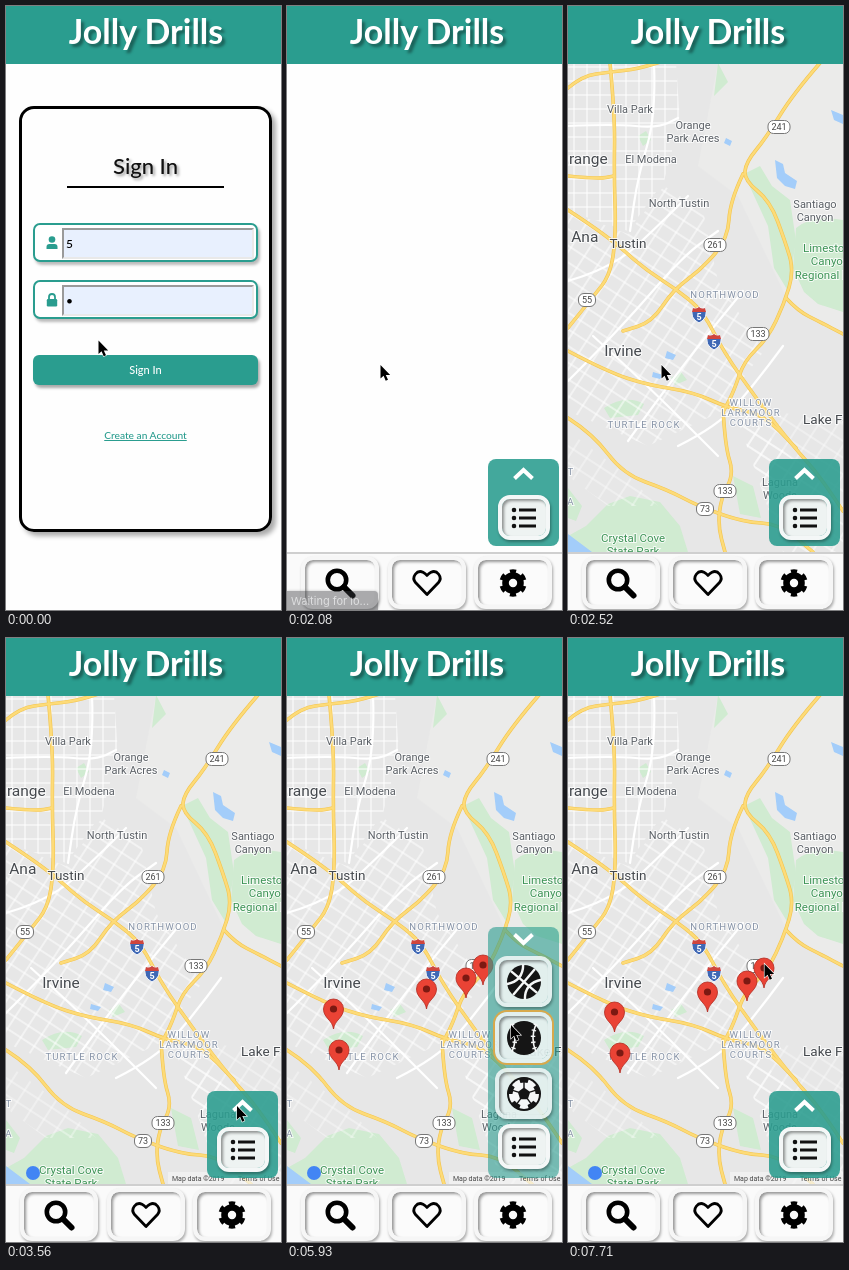
These frames come from a looping animation (275 px wide and 604 px high, 8 s). An HTML page:

```html
<!DOCTYPE html>
<html lang="en">
<head>
<meta charset="utf-8">
<title>Sports finder</title>
<style>
html, body { margin: 0; width: 100%; height: 100%; overflow: hidden; background: #fefefe; }
#stage { position: absolute; inset: 0; width: 275px; height: 604px; overflow: hidden; background: #fefefe;
  font: 500 11px Lato, 'Open Sans', sans-serif; }
#stage div, #stage > svg, #home > svg { position: absolute; box-sizing: border-box; }
.line { left: 0; width: 279px; text-align: center; white-space: nowrap; }
#head { left: 0; top: 0; width: 275px; height: 58px; background: #2a9d8f; }
#head .line { top: 0; width: 280px; font-size: 34px; line-height: 49px; font-weight: 700; color: #fff; text-shadow: 3px 3px 3px #0006; }
#card { left: 13px; top: 100px; width: 253px; height: 426px; border: 3px solid #000; border-radius: 15px;
  box-shadow: 4px 4px 5px #0005; }
#login .title { top: 145px; font-size: 22px; line-height: 30px; color: #111; text-shadow: 2px 2px 3px #0006; }
#rule { left: 61px; top: 180px; width: 157px; height: 1.6px; background: #000; }
.field { left: 27px; width: 225px; height: 39px; border: 2px solid #2a9d8f; border-radius: 7px; background: #fff;
  box-shadow: 2px 3px 3px #0004; }
.field div { left: 27px; top: 3px; width: 192px; height: 31px; border: 2px solid; border-color: #9a9a9a #e9e9e9 #e9e9e9 #9a9a9a;
  background: #e8f0fe; padding-left: 2px; line-height: 27px; font-size: 12px; color: #000; }
.field svg { position: absolute; left: 9px; top: 9px; fill: #2a9d8f; }
#submit { left: 27px; top: 349px; width: 225px; border-radius: 6px; background: #2a9d8f; color: #fff; text-align: center; }
#link { color: #2a9d8f; font-size: 10.2px; line-height: 18px; text-decoration: underline; }
#nav { left: 0; top: 546px; width: 275px; height: 58px; border-top: 2px solid #cfcfcf; background: #fafafa; }
#panel { left: 201px; width: 71px; border-radius: 8px; }
.btn { display: flex; align-items: center; justify-content: center; border: 4px solid #f6f6f6; border-radius: 12px;
  background: #fbfbfb; background-clip: padding-box; box-shadow: 1px 2px 3px #0005, inset 2px 2px 3px #0006; }
.btn svg { flex: none; }
.nav { top: 550px; width: 78px; height: 53px; }
.ball { left: 208px; width: 57px; height: 51px; border-color: #f4f7f7dd; background-color: #f6f8f8d8; }
#list { left: 211px; width: 52px; height: 45px; border-color: #f4f7f7; background-color: #eef3f2; }
#status { left: 0; top: 585px; width: 91px; height: 19px; border-radius: 0 4px 0 0; background: #3b3c40; color: #b9babd;
  font: 11px/20px Inter, sans-serif; padding-left: 4px; white-space: nowrap; box-shadow: 0 0 3px #0008; }
#map text { font-family: Roboto, 'Noto Sans', sans-serif; font-weight: 400; text-anchor: middle; fill: #5b6066;
  stroke: #fffc; stroke-width: 2px; paint-order: stroke; font-size: 11px; }
#map .city { font-size: 15.5px; fill: #45494e; }
#map .town { font-size: 13.5px; fill: #45494e; }
#map .area { font-size: 9.6px; letter-spacing: 1.1px; fill: #8592a6; }
#map .park { font-size: 11.5px; fill: #3d9456; }
#map .tag { font-size: 9px; fill: #444; stroke: none; }
#map .exit { font-size: 9px; font-weight: 700; fill: #fff; stroke: none; }
#map .note { font-size: 7px; fill: #444; stroke: none; text-anchor: start; }
</style>
</head>
<body>
<div id="stage">
  <div id="login">
    <div id="card"></div>
    <div class="line title">Sign In</div>
    <div id="rule"></div>
    <div class="field" style="top:217px"><svg width="16" height="18" viewBox="-8 -9 16 18"><circle cy="-3.5" r="3.3"/><path d="M-5.5 6V4Q-5.5 1 -2.5 1H2.5Q5.5 1 5.5 4V6Z"/></svg><div>5</div></div>
    <div class="field" style="top:274px"><svg width="16" height="18" viewBox="-8 -9 16 18"><rect x="-5.2" y="-1" width="10.4" height="7.5" rx="1.2"/><path d="M-3 -1V-3a3 3 0 0 1 6 0V-1" fill="none" stroke="#2a9d8f" stroke-width="1.8"/></svg><div>•</div></div>
    <div id="submit">Sign In</div>
    <div class="line" id="link">Create an Account</div>
  </div>

  <div id="home">
    <svg id="map" width="275" height="546">
      <defs>
        <pattern id="grid" width="13" height="14" patternUnits="userSpaceOnUse"><path d="M0 5H13M6 0V14" stroke="#fff"/></pattern>
        <pattern id="slant" width="16" height="14" patternUnits="userSpaceOnUse" patternTransform="rotate(33)"><path d="M0 5H16M6 0V14" stroke="#fff"/></pattern>
        <g id="pin"><path d="M0 0C-1 -9 -10 -11 -10 -20a10 10 0 0 1 20 0C10 -11 1 -9 0 0Z" fill="#ea4335" stroke="#b3291f" stroke-width=".8"/><circle cy="-20" r="3.6" fill="#7c1912"/></g>
        <g id="shield"><path d="M-6 -7Q-3 -5.5 0 -8Q3 -5.5 6 -7Q10 3 0 8Q-10 3 -6 -7Z" fill="#3f68b5" stroke="#fff"/><path d="M-6 -7Q-3 -5.5 0 -8Q3 -5.5 6 -7L7 -3H-7Z" fill="#d0453d"/></g>
      </defs>
      <rect width="275" height="546" fill="#e7e7e7"/>
      <path d="M150 57H275V330L220 295L170 190L130 160Z" fill="#ebebea"/>
      <g fill="#d0ebd1">
        <path d="M176 168L192 160L204 180L222 194L228 235L220 285L206 262L200 220Z"/>
        <path d="M228 222Q245 208 275 214V306L250 298L236 286L225 262Z"/>
        <path d="M18 520L40 498L62 490L92 496L112 520L120 546H0V530Z"/>
        <path d="M165 470L185 480L193 512L172 508ZM0 482L14 500L8 515L0 512ZM36 402Q58 388 76 398L70 409L42 412Z"/>
        <path d="M150 57L160 76L146 90ZM70 130l8 -5 5 9 -8 6ZM103 372l10 -6 6 8 -12 5Z"/>
      </g>
      <path d="M0 57H108L112 115L96 175L60 225L0 205Z" fill="url(#grid)"/>
      <path d="M0 205L60 228L96 180L135 205L150 275L196 345L160 392L275 500V546H215L165 400L80 440L0 405Z" fill="url(#slant)"/>
      <path d="M0 425L60 470L90 500L40 500L0 470ZM165 400L275 415V500L190 470Z" fill="url(#slant)" opacity=".7"/>
      <path d="M207 154l8 4 2 9 12 8 -2 8 -10 -3 -8 -8ZM263 104l12 5v9l-9 -4ZM158 132l6 3 -2 5 -6 -3ZM99 345l9 4 -3 5 -8 -2ZM85 366l10 3 -3 4 -8 -2ZM0 528L24 546H0Z" fill="#a3cdfa"/>
      <g id="roads" fill="none" stroke-linecap="round"></g>
      <g id="tags"></g>
      <text x="62" y="107">Villa Park</text><text x="125" y="123">Orange</text><text x="125" y="136">Park Acres</text>
      <text x="83" y="157">El Modena</text><text x="111" y="201">North Tustin</text>
      <text x="247" y="202">Santiago</text><text x="247" y="215">Canyon</text>
      <text x="212" y="480">Laguna</text><text x="212" y="493">Woods</text>
      <text class="city" x="15" y="158">Orange</text><text class="city" x="-5" y="236">Santa Ana</text><text class="city" x="55" y="350">Irvine</text>
      <text class="town" x="60" y="242">Tustin</text><text class="town" x="270" y="418">Lake Forest</text>
      <text class="park" x="262" y="246">Limestone</text><text class="park" x="262" y="259">Canyon</text><text class="park" x="262" y="273">Regional Park</text>
      <text class="park" x="65" y="536">Crystal Cove</text><text class="park" x="65" y="549">State Park</text>
      <text class="area" x="157" y="292">NORTHWOOD</text><text class="area" x="76" y="422">TURTLE ROCK</text>
      <text class="area" x="183" y="400">WILLOW</text><text class="area" x="183" y="410">LARKMOOR</text><text class="area" x="183" y="420">COURTS</text>
      <text class="area" x="3" y="469">T</text><text class="area" x="3" y="499">A</text>
      <g id="pins"></g>
      <g id="credit">
        <circle cx="27" cy="535" r="7" fill="#4285f4"/>
        <rect x="162" y="534" width="113" height="12" fill="#f5f5f5b0"/>
        <text class="note" x="166" y="542.5">Map data ©2019</text><text class="note" x="232" y="542.5">Terms of Use</text>
      </g>
    </svg>
    <div id="panel"></div>
    <svg width="275" height="604"><path id="chevron" fill="none" stroke="#fff" stroke-width="4"/></svg>
    <div id="balls">
      <div class="btn ball" style="top:318px"><svg width="36" height="36" viewBox="-18 -18 36 36"><circle r="17" fill="#151515"/><path transform="rotate(40)" d="M-17 0H17M0 -17V17M-12 -13Q-1 0 -12 13M12 -13Q1 0 12 13" fill="none" stroke="#f5f7f7" stroke-width="2.4"/></svg></div>
      <div class="btn ball" id="baseball" style="top:374px"><svg width="36" height="36" viewBox="-18 -18 36 36"><circle r="17" fill="#151515"/><g fill="none" stroke="#f5f7f7"><path d="M-12 -14Q-6 0 -12 14M12 -14Q6 0 12 14" stroke-width="1.6"/><path d="M-12 -14Q-6 0 -12 14M12 -14Q6 0 12 14" stroke-width="4.5" stroke-dasharray="1.4 4.6"/></g></svg></div>
      <div class="btn ball" style="top:430px"><svg width="36" height="36" viewBox="-18 -18 36 36"><circle r="17" fill="#151515"/><circle r="15" fill="#f5f7f7"/><g fill="none" stroke="#151515"><circle r="14" stroke-width="5" pathLength="10" stroke-dasharray="1 1" transform="rotate(-108)"/><path d="M0 -6V-12M5.7 -1.9L11.4 -3.7M3.5 4.9L7 9.7M-3.5 4.9L-7 9.7M-5.7 -1.9L-11.4 -3.7" stroke-width="1.4"/></g><path d="M0 -6.5L6.2 -2L3.8 5.3H-3.8L-6.2 -2Z" fill="#151515"/></svg></div>
    </div>
    <div class="btn" id="list"><svg width="28" height="24" viewBox="-14 -12 28 24"><path d="M-5 -8H12M-5 0H12M-5 8H12" stroke="#111" stroke-width="3"/><path d="M-10 -8h.01M-10 0h.01M-10 8h.01" stroke="#111" stroke-width="4.6" stroke-linecap="round"/></svg></div>
    <div id="nav"></div>
    <div class="btn nav" style="left:14px"><svg width="34" height="34" viewBox="-17 -17 34 34" fill="none" stroke="#000"><circle cx="-3" cy="-3" r="9.2" stroke-width="4.6"/><path d="M4 4L12.5 12.5" stroke-width="6" stroke-linecap="round"/></svg></div>
    <div class="btn nav" style="left:101px"><svg width="34" height="34" viewBox="-17 -17 34 34"><path d="M0 11.5L-11.5 -.5C-16 -6 -10 -13.5 -4 -10.8Q-1.5 -9.5 0 -7.5Q1.5 -9.5 4 -10.8C10 -13.5 16 -6 11.5 -.5Z" fill="none" stroke="#000" stroke-width="2.8" stroke-linejoin="round"/></svg></div>
    <div class="btn nav" style="left:187px"><svg width="34" height="34" viewBox="-17 -17 34 34" fill="none" stroke="#000"><circle r="7.5" stroke-width="6.6"/><circle r="11.5" stroke-width="4.4" pathLength="12" stroke-dasharray="1 1" transform="rotate(15)"/></svg></div>
  </div>

  <div id="head"><div class="line">Jolly Drills</div></div>
  <div id="status">Waiting for lo...</div>
  <svg width="275" height="604"><path id="cursor" d="M0 0V13.5L3.1 10.7L5.2 15.8L7.5 14.8L5.3 9.9H9.7Z" stroke="#fff" stroke-width="1.2" paint-order="stroke"/></svg>
</div>
<script>
const $ = id => document.getElementById(id);
const show = (id, on) => $(id).style.display = on ? '' : 'none';

// Smooth path through the midpoints of a list of points
function curve(points) {
  const p = points.split(' ').map(s => s.split(',').map(Number));
  let d = 'M' + p[0];
  for (let i = 1; i < p.length - 1; i++)
    d += `Q${p[i]} ${(p[i][0] + p[i + 1][0]) / 2},${(p[i][1] + p[i + 1][1]) / 2}`;
  return d + 'L' + p[p.length - 1];
}

const streets = [
  '0,120 45,118 90,122 110,112', '86,57 88,110 70,170 62,225', '0,275 45,262 95,215 120,190',
  '0,375 50,325 115,250 150,225', '60,435 110,365 175,285', '25,330 75,375 150,450', '110,440 150,420 185,380 215,340'
];
const highways = [
  '0,82 14,70 42,66 70,63 105,52', '42,57 47,110 46,170 48,225 43,268 24,292 0,322',
  '0,170 30,173 46,170', '0,204 40,230 75,262 108,283 135,305 155,345 190,395 225,440 250,468 275,505',
  '175,168 162,195 160,232 135,262 105,284 84,316 55,325',
  '252,57 225,88 198,132 178,156 176,174 202,195 217,235 226,265 216,298 200,332 176,355 166,385 155,406',
  '218,292 230,305 252,316 275,328', '0,345 40,366 80,379 125,386 160,402 195,408 228,442',
  '155,402 157,440 166,468 153,492 150,520 157,546', '0,412 25,428 55,468 100,484 130,500 175,516 212,518 245,546'
];
const stroke = (list, color, width) =>
  list.map(p => `<path d="${curve(p)}" stroke="${color}" stroke-width="${width}"/>`).join('');
$('roads').innerHTML = stroke(streets, '#fff', 2.2) + stroke(highways, '#f3c550', 3.6) + stroke(highways, '#fddb78', 2.4);

const routes = [[241, 211, 121], [261, 147, 239], [55, 19, 294], [133, 190, 328], [133, 157, 485], [73, 137, 503]];
const exits = [[131, 309], [146, 336]];
const spots = [[196, 350], [179, 363], [139.5, 374], [46.5, 394], [52, 435]];
const use = (id, [x, y]) => `<use href="#${id}" x="${x}" y="${y}"/>`;

$('tags').innerHTML = routes.map(([n, x, y]) => {
  const w = n > 99 ? 22 : 17;
  return `<rect x="${x - w / 2}" y="${y - 6.5}" width="${w}" height="13" rx="5.5" fill="#fff" stroke="#777"/>
    <text class="tag" x="${x}" y="${y + 3.3}">${n}</text>`;
}).join('') + exits.map(([x, y]) => use('shield', [x, y]) + `<text class="exit" x="${x}" y="${y + 5}">5</text>`).join('');
$('pins').innerHTML = spots.map(p => use('pin', p)).join('');

// Pointer route: tick, x, y
const route = [
  [0, 92.5, 334.5], [2, 93, 357], [3, 93, 357], [4, 93.5, 359], [17, 93.5, 359], [20, 116.5, 476],
  [24, 231, 468], [28, 231, 468], [30, 224.5, 421], [32, 224, 387], [40, 224, 387],
  [46, 233, 297], [47, 233, 297], [52, 196.5, 326], [54, 196.5, 326]
];
function pointer(tick) {
  const i = route.findIndex(k => k[0] > tick);
  const [t0, x0, y0] = route[i - 1], [t1, x1, y1] = route[i];
  const f = (tick - t0) / (t1 - t0);
  return [x0 + (x1 - x0) * f, y0 + (y1 - y0) * f];
}

function draw() {
  // The screen refreshes 54 times per loop
  const tick = Math.min(53, Math.floor(performance.now() % 8000 * 54 / 8000 + 0.06));
  const home = tick >= 13, open = tick >= 27 && tick < 48;
  show('login', !home);
  show('home', home);

  const height = tick >= 6 ? 42 : 30;
  const button = $('submit').style;
  button.height = button.lineHeight = height + 'px';
  button.boxShadow = tick >= 8 ? '0 0 0 2.5px #add8f0' : '2px 3px 3px #0005';
  $('link').style.top = 390 + height + 'px';

  show('status', tick >= 10 && tick < 15);
  $('status').style.opacity = tick === 14 ? 0.42 : 1;

  $('map').style.opacity = Math.max(0, Math.min(1, (tick - 14) / 3));
  show('credit', tick >= 18);
  show('pins', tick >= 39);
  const drop = tick === 39 ? -120 : tick === 40 ? -3 : 0;
  $('pins').setAttribute('transform', `translate(0 ${drop})`);

  const panel = $('panel').style;
  panel.top = (open ? 289 : 453) + 'px';
  panel.height = (open ? 251 : 87) + 'px';
  panel.background = `rgba(42,157,143,${open ? 0.6 : 0.88})`;
  show('balls', open);
  $('list').style.top = (open ? 486 : 489) + 'px';
  $('chevron').setAttribute('d', open ? 'M227.5 296.5L236.5 305L245.5 296.5' : 'M227.5 472.5L236.5 464L245.5 472.5');
  $('baseball').style.boxShadow = tick >= 37 ? '0 0 0 2px #d8a94c, inset 2px 2px 3px #0006' : '';

  $('cursor').setAttribute('transform', `translate(${pointer(tick)})`);
  requestAnimationFrame(draw);
}
draw();
</script>
</body>
</html>
```
